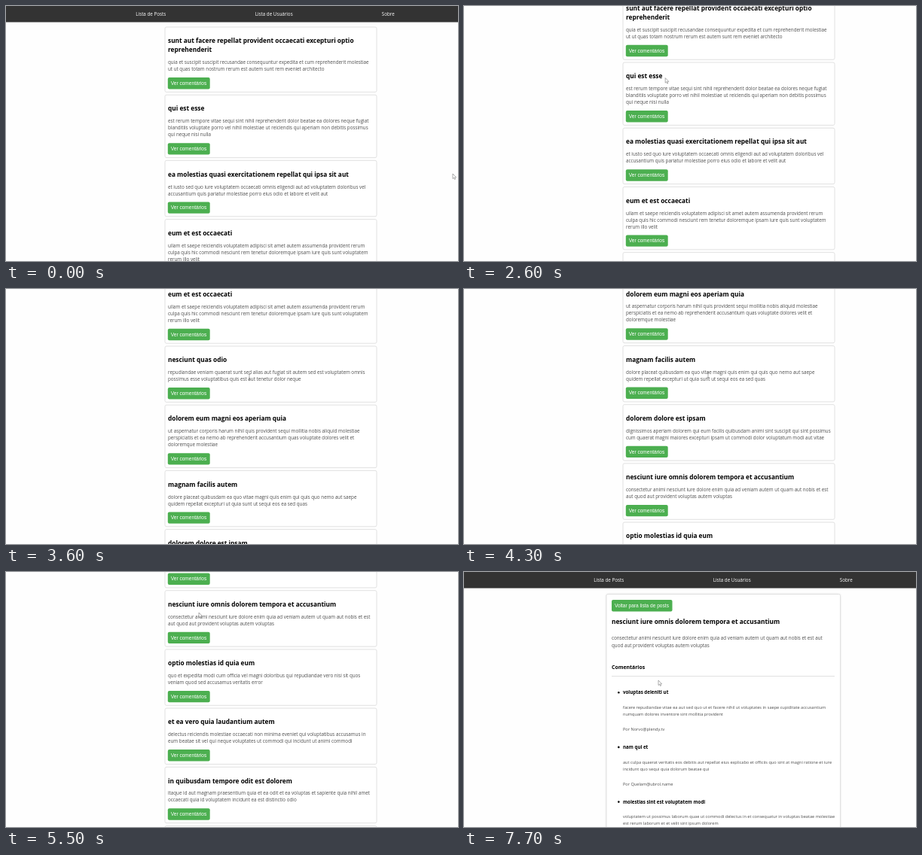
Recreate the animation shown at these times as an HTML page with a canvas. Size 600 by 339 pixels, loop 8000 ms.

```html
<!DOCTYPE html>
<html lang="pt">
<head>
<meta charset="utf-8">
<style>
html, body { margin: 0; width: 100%; height: 100%; overflow: hidden; background: #fefefe; }
canvas { display: block; width: 600px; height: 339px; }
</style>
</head>
<body>
<canvas id="stage"></canvas>
<script>
const canvas = document.getElementById('stage');
const ctx = canvas.getContext('2d');
const ratio = window.devicePixelRatio || 1;
canvas.width = 600 * ratio;
canvas.height = 339 * ratio;

const LOOP = 8000, STEP = 100, DETAIL_AT = 6000;
const SANS = '"Open Sans", "Noto Sans", sans-serif';
const BODY = `6.28px ${SANS}`;
const TITLE = `bold 8.32px ${SANS}`;
const HEADING = `bold 6.9px ${SANS}`;
const NAME = `bold 6.2px ${SANS}`;
const SMALL = `5.6px ${SANS}`;
const BUTTON = '6.59px "Liberation Sans", Arial, sans-serif';
const INK = '#000', GREY = '#4d4d4d', BORDER = '#dedede';

// Title and body, lines separated by "|"
const posts = [
  ['sunt aut facere repellat provident occaecati excepturi optio|reprehenderit',
   'quia et suscipit suscipit recusandae consequuntur expedita et cum reprehenderit molestiae|ut ut quas totam nostrum rerum est autem sunt rem eveniet architecto'],
  ['qui est esse',
   'est rerum tempore vitae sequi sint nihil reprehenderit dolor beatae ea dolores neque fugiat|blanditiis voluptate porro vel nihil molestiae ut reiciendis qui aperiam non debitis possimus|qui neque nisi nulla'],
  ['ea molestias quasi exercitationem repellat qui ipsa sit aut',
   'et iusto sed quo iure voluptatem occaecati omnis eligendi aut ad voluptatem doloribus vel|accusantium quis pariatur molestiae porro eius odio et labore et velit aut'],
  ['eum et est occaecati',
   'ullam et saepe reiciendis voluptatem adipisci sit amet autem assumenda provident rerum|culpa quis hic commodi nesciunt rem tenetur doloremque ipsam iure quis sunt voluptatem|rerum illo velit'],
  ['nesciunt quas odio',
   'repudiandae veniam quaerat sunt sed alias aut fugiat sit autem sed est voluptatem omnis|possimus esse voluptatibus quis est aut tenetur dolor neque'],
  ['dolorem eum magni eos aperiam quia',
   'ut aspernatur corporis harum nihil quis provident sequi mollitia nobis aliquid molestiae|perspiciatis et ea nemo ab reprehenderit accusantium quas voluptate dolores velit et|doloremque molestiae'],
  ['magnam facilis autem',
   'dolore placeat quibusdam ea quo vitae magni quis enim qui quis quo nemo aut saepe|quidem repellat excepturi ut quia sunt ut sequi eos ea sed quas'],
  ['dolorem dolore est ipsam',
   'dignissimos aperiam dolorem qui eum facilis quibusdam animi sint suscipit qui sint possimus|cum quaerat magni maiores excepturi ipsam ut commodi dolor voluptatum modi aut vitae'],
  ['nesciunt iure omnis dolorem tempora et accusantium',
   'consectetur animi nesciunt iure dolore enim quia ad veniam autem ut quam aut nobis et est|aut quod aut provident voluptas autem voluptas'],
  ['optio molestias id quia eum',
   'quo et expedita modi cum officia vel magni doloribus qui repudiandae vero nisi sit quos|veniam quod sed accusamus veritatis error'],
  ['et ea vero quia laudantium autem',
   'delectus reiciendis molestiae occaecati non minima eveniet qui voluptatibus accusamus in|eum beatae sit vel qui neque voluptates ut commodi qui incidunt ut animi commodi'],
  ['in quibusdam tempore odit est dolorem',
   'itaque id aut magnam praesentium quia et ea odit et ea voluptas et sapiente quia nihil amet|occaecati quia id voluptatem incidunt ea est distinctio odio'],
  ['dolorum ut in voluptas', 'aut dicta possimus sint mollitia']
];

const comments = [
  ['voluptas deleniti ut', 'facere repudiandae vitae ea aut sed quo ut et facere nihil ut voluptates in saepe cupiditate accusantium|numquam dolores inventore sint mollitia provident', 'Norvo@plendy.tv'],
  ['nam qui et', 'aut culpa quaerat veritatis eos debitis aut repellat eius explicabo et officiis quo sint at magni ratione et iure|incidunt quo sequi quia dolorum beatae qui', 'Quelam@ubrol.name'],
  ['molestias sint est voluptatem modi', 'voluptatem ut possimus laborum quae ut commodi delectus in et consequatur in voluptas beatae molestiae|est rerum laborum et et velit sint ipsum dolorem', '']
];

// [time, scroll]
const scrollKeys = [[2400, 0], [2900, 107.9], [3600, 294.8], [4300, 460.7], [5300, 667.9]];

// [time, x, y] of the pointer's hot spot
const pointerKeys = [
  [0, 593, 223], [200, 300, 100], [300, 200, 120], [400, 316, 168], [500, 316, 168],
  [700, 258, 291], [900, 258, 291], [1100, 300, 180], [1400, 194, 8], [1600, 194, 8],
  [2400, 262, 90], [2900, 275, 104], [3600, 323, 117], [4300, 324, 114], [5200, 324, 110],
  [5500, 256, 54], [5800, 243, 88], [6000, 243, 88], [6800, 210, 47], [7300, 258, 146],
  [7400, 258, 146], [7600, 228, 299], [7700, 258, 144]
];

function sample(keys, t) {
  const next = keys.findIndex(k => k[0] > t);
  if (next === 0) return keys[0].slice(1);
  if (next < 0) return keys[keys.length - 1].slice(1);
  const a = keys[next - 1], b = keys[next];
  const p = (t - a[0]) / (b[0] - a[0]);
  return a.slice(1).map((v, i) => v + (b[i + 1] - v) * p);
}

function text(lines, x, y, font, color, lineHeight = 9) {
  ctx.font = font;
  ctx.fillStyle = color;
  lines.split('|').forEach((line, i) => ctx.fillText(line, x, y + i * lineHeight));
}

function box(x, y, w, h, radius, fill, stroke) {
  ctx.beginPath();
  ctx.roundRect(x, y, w, h, radius);
  ctx.fillStyle = fill;
  ctx.fill();
  if (!stroke) return;
  ctx.strokeStyle = stroke;
  ctx.lineWidth = 0.9;
  ctx.stroke();
}

function button(label, x, y, w) {
  box(x, y, w, 15.4, 2, '#4caf50');
  text(label, x + 3.9, y + 9.9, BUTTON, '#fff');
}

function nav() {
  ctx.fillStyle = '#333';
  ctx.fillRect(0, 0, 600, 21.5);
  text('Lista de Posts', 172.3, 13.3, BODY, '#fff');
  text('Lista de Usuários', 330.7, 13.3, BODY, '#fff');
  text('Sobre', 498.8, 13.3, BODY, '#fff');
}

function listPage(scroll) {
  ctx.save();
  ctx.translate(0, -scroll);
  nav();
  let top = 28;
  for (const [title, body] of posts) {
    const extra = (title.split('|').length - 1) * 12;
    const buttonTop = top + extra + 37 + body.split('|').length * 9;
    const height = buttonTop - top + 19.4;
    if (top < scroll + 339 && top + height > scroll) {
      box(211, top, 281, height, 2, '#fff', BORDER);
      text(title, 215, top + 21.2, TITLE, INK, 12);
      text(body, 215, top + extra + 37.1, BODY, GREY);
      button('Ver comentários', 214.8, buttonTop, 55.9);
    }
    top += height + 3.8;
  }
  ctx.restore();
}

function detailPage() {
  nav();
  ctx.save();
  ctx.shadowColor = 'rgba(0,0,0,.15)';
  ctx.shadowBlur = 3 * ratio;
  box(189, 29.5, 310.5, 330, 2, '#fff');
  ctx.restore();
  box(189, 29.5, 310.5, 330, 2, '#fff', BORDER);
  button('Voltar para lista de posts', 196, 37, 80.5);
  text(posts[8][0], 196, 69.2, TITLE, INK);
  text(posts[8][1].replace('|aut ', ' aut|'), 196, 90, BODY, GREY, 10);
  text('Comentários', 196, 129, HEADING, INK);
  ctx.fillStyle = '#ddd';
  ctx.fillRect(196, 138, 296, 0.9);
  comments.forEach(([title, body, author], i) => {
    const y = 162.2 + i * 72.7;
    ctx.beginPath();
    ctx.arc(205.3, y - 2, 1.3, 0, 7);
    ctx.fillStyle = INK;
    ctx.fill();
    text(title, 211, y, NAME, INK);
    text(body, 211, y + 19.7, SMALL, GREY);
    text('Por ' + author, 211, y + 48.7, SMALL, GREY);
  });
}

function pointer(t) {
  const [x, y] = sample(pointerKeys, t);
  const overLink = t >= 1400 && t < 1700;
  const overText = t >= 3400 && t < 5400;
  ctx.save();
  ctx.translate(x, y);
  ctx.lineWidth = 0.6;
  ctx.strokeStyle = overLink ? '#000' : '#777';
  ctx.fillStyle = '#fff';
  const shape = overText ? 'M-1.3-3.5H1.3M0-3.5V3.5M-1.3 3.5H1.3'
    : overLink ? 'M0 0H1.2V2.6L4 3.3V5.4L3.2 7H.7L-1.2 4L0 4Z'
    : 'M0 0V6.6L1.5 5.2L2.6 7.6L3.6 7.1L2.6 4.8H4.6Z';
  const path = new Path2D(shape);
  if (!overText) ctx.fill(path);
  ctx.stroke(path);
  ctx.restore();
  if (overLink) box(-1, 337.3, 38, 4, 1, '#eee', '#ccc');
}

function draw(now) {
  const t = Math.floor(now % LOOP / STEP) * STEP;
  ctx.setTransform(ratio, 0, 0, ratio, 0, 0);
  ctx.fillStyle = '#fefefe';
  ctx.fillRect(0, 0, 600, 339);
  if (t < DETAIL_AT) listPage(sample(scrollKeys, t)[0]);
  else detailPage();
  pointer(t);
}

function tick() {
  draw(performance.now());
  requestAnimationFrame(tick);
}
tick();
</script>
</body>
</html>
```
